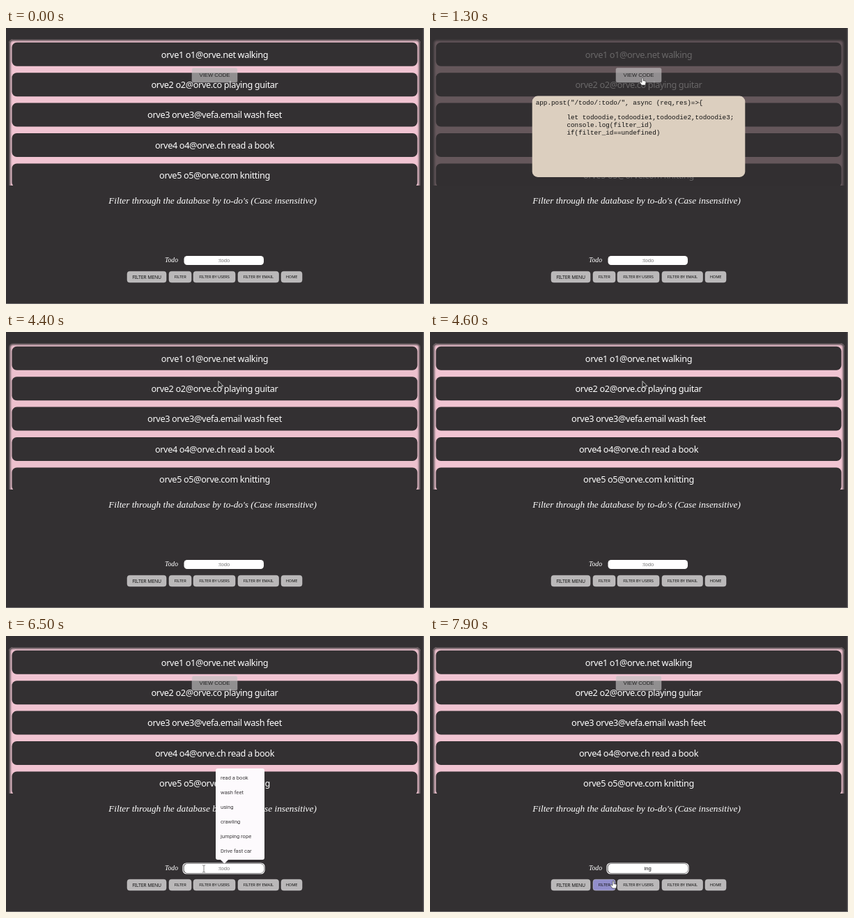
Recreate the animation shown at these times as an HTML page. Size 600x396 px, loop 8000 ms.

```html
<!DOCTYPE html>
<html lang="en">
<head>
<meta charset="utf-8">
<title>Filter by to-do</title>
<style>
  html, body { margin: 0; width: 100%; height: 100%; overflow: hidden; background: #333032; }
  svg { display: block; }
  text { white-space: pre; }
  .middle { text-anchor: middle; }
  .row { font: 12.7px "Noto Sans", sans-serif; letter-spacing: -.36px; fill: #fff; }
  .label { font: 5.7px "Noto Sans", sans-serif; letter-spacing: -.06px; fill: #111; }
  .serif { font: italic 13.25px "Liberation Serif", serif; fill: #fff; }
  .sans { font: 7.7px "Liberation Sans", sans-serif; }
  .code { font: 9.33px "Liberation Mono", monospace; fill: #111; }
  .option { font: 7.6px Roboto, sans-serif; fill: #3c3a3c; }
</style>
</head>
<body>
<svg width="600" height="396" viewBox="0 0 600 396">
  <defs>
    <clipPath id="frame"><path d="M4 226V22a6 6 0 0 1 6-6H589a6 6 0 0 1 6 6V226z"/></clipPath>
    <filter id="soft" x="-5%" y="-5%" width="110%" height="110%"><feGaussianBlur stdDeviation="1.6"/></filter>
  </defs>
  <rect width="600" height="396" fill="#333032"/>
  <path d="M599.3 0V396M0 395.6H600" stroke="#777476"/>

  <g id="list" clip-path="url(#frame)">
    <rect x="4" y="16" width="591" height="212" fill="#f1c4d2"/>
    <rect x="4" y="16" width="591" height="230" rx="6" fill="none" stroke="#333032" stroke-width="4" filter="url(#soft)"/>
  </g>

  <g id="view">
    <rect x="267" y="57.5" width="65" height="20.5" rx="2" fill="#c2c0c1" stroke="#d0ced0" stroke-width=".5" opacity=".66"/>
    <text class="sans middle" x="299.5" y="70.4" fill="#222">VIEW CODE</text>
  </g>

  <text class="serif middle" x="296.5" y="252">Filter through the database by to-do's (Case insensitive)</text>
  <text class="serif" x="228" y="335.5" style="font-size:9.7px">Todo</text>
  <rect id="ring" x="254" y="326" width="117" height="15" rx="5" fill="none" stroke="#fff" stroke-width="1.2"/>
  <rect x="255.5" y="327" width="114.5" height="13" rx="4.5" fill="#fff"/>
  <text id="field" class="sans middle" x="312.7" y="335.8"></text>
  <g id="buttons"></g>

  <g id="options">
    <path d="M304 190H368a3 3 0 0 1 3 3V318a3 3 0 0 1-3 3H319L313.500 326.500 308 321H304a3 3 0 0 1-3-3V193a3 3 0 0 1 3-3z" fill="#fdfafd"/>
  </g>

  <g id="popup">
    <rect x="146.500" y="97.500" width="306" height="116.500" rx="8" fill="#dccfbf"/>
  </g>

  <path id="arrow" d="M0 0V9.500L2.300 7.500 3.800 11 5.300 10.300 3.800 7H6.800z" fill="#222" stroke="#eee" stroke-width=".8"/>
  <path id="hand" d="M-1 1Q0-.6 1 1V4.500L4 5Q5.200 5.200 5 7L4.200 11H-1.200L-4 7Q-4.300 5.600-3 5.800L-1 7.200z" fill="#fff" stroke="#222" stroke-width=".6"/>
  <path id="beam" d="M-2-5Q0-5 0-4Q0-5 2-5M0-4V4M-2 5Q0 5 0 4Q0 5 2 5" fill="none" stroke="#777" stroke-width=".9"/>
</svg>
<script>
const LOOP = 8000;
const $ = id => document.getElementById(id);

function add(parent, tag, attrs, text = "") {
  const el = document.createElementNS("http://www.w3.org/2000/svg", tag);
  for (const name in attrs) el.setAttribute(name, attrs[name]);
  el.textContent = text;
  return parent.appendChild(el);
}

["orve1 o1@orve.net walking", "orve2 o2@orve.co playing guitar", "orve3 orve3@vefa.email wash feet",
 "orve4 o4@orve.ch read a book", "orve5 o5@orve.com knitting"].forEach((text, i) => {
  const y = 20.800 + i * 43.400;
  add($("list"), "rect", { x: 8.500, y, width: 582, height: 34, rx: 7, fill: "#333032" });
  add($("list"), "text", { class: "row middle", x: 299.500, y: y + 21.700 }, text);
});

const buttons = [["FILTER MENU", 174, 56], ["FILTER", 234, 32], ["FILTER BY USERS", 269, 60],
  ["FILTER BY EMAIL", 333, 58.500], ["HOME", 395, 30]].map(([text, x, width], i) => {
  const box = add($("buttons"), "rect", { x, y: 349.300, width, height: 15.700, rx: 3.500, stroke: "#d0ced0", "stroke-width": .5 });
  box.style.fill = "#bab8b9";
  const label = add($("buttons"), "text", { class: "label middle", x: x + width / 2, y: i ? 359.200 : 359.700 }, text);
  if (!i) label.style.cssText = "font-size:6.9px;letter-spacing:-.16px";
  return box;
});

["read a book", "wash feet", "using", "crawling", "jumping rope", "Drive fast car"].forEach((text, i) =>
  add($("options"), "text", { class: "option", x: 308, y: 205.700 + i * 21.100 }, text));

// Code lines: text, line number, indent in characters
const typed = ["if(filter_id==undefined){", "// contains regex"];
const codeLines = [['app.post("/todo/:todo/", async (req,res)=>{', 0, 0],
  ["let todoodie,todoodie1,todoodie2,todoodie3;", 2, 8], ["console.log(filter_id)", 3, 8], ["", 4, 8], ["", 5, 8]]
  .map(([text, line, indent]) =>
    add($("popup"), "text", { class: "code", x: 151.500 + indent * 5.600, y: 110.300 + line * 10.570 }, text));

const clamp = v => Math.min(1, Math.max(0, v));
const mix = (a, b, p) => a + (b - a) * p;
const bezier = (s, a, b) => 3 * s * (1 - s) ** 2 * a + 3 * s * s * (1 - s) * b + s ** 3;

// The CSS "ease" curve
function ease(t, start, duration = 1000) {
  const x = clamp((t - start) / duration);
  let low = 0, high = 1;
  for (let i = 0; i < 20; i++) {
    const mid = (low + high) / 2;
    if (bezier(mid, .25, .25) < x) low = mid; else high = mid;
  }
  return bezier(low, .1, 1);
}

// Piecewise linear value through [time, value] stops
function along(t, stops) {
  const i = stops.findIndex(stop => t < stop[0]);
  if (i === 0) return stops[0][1];
  if (i < 0) return stops.at(-1)[1];
  const [[t0, v0], [t1, v1]] = [stops[i - 1], stops[i]];
  return mix(v0, v1, (t - t0) / (t1 - t0));
}

function place(id, visible, x, y) {
  $(id).setAttribute("visibility", visible ? "visible" : "hidden");
  $(id).setAttribute("transform", `translate(${x} ${y})`);
}

function draw(t) {
  const open = ease(t, 350) - ease(t, 3600);
  $("list").setAttribute("opacity", 1 - .74 * open);
  $("popup").setAttribute("opacity", open);
  $("popup").setAttribute("transform", `translate(299.5 172) scale(${open}) translate(-299.5 -172)`);
  $("view").setAttribute("opacity", 1 - ease(t, 3600, 950) + ease(t, 4600));

  const count = Math.floor(along(t, [[200, 10], [800, 17], [1300, 24], [3400, 44]]) + .001);
  codeLines[3].textContent = typed[0].slice(0, count);
  codeLines[4].textContent = typed[1].slice(0, Math.max(0, count - 27));

  const entry = "ing".slice(0, t < 6800 ? 0 : Math.floor((t - 6800) / 100) + 1);
  $("field").textContent = entry || ":todo";
  $("field").setAttribute("fill", entry ? "#111" : "#777");
  $("ring").setAttribute("opacity", t >= 6000 ? 1 : 0);
  $("options").setAttribute("opacity", t < 6800 ? clamp((t - 5950) / 100) : 0);

  const hover = clamp((t - 7600) / 250);
  buttons[1].style.fill = `rgb(${mix(186, 145, hover)} ${mix(184, 142, hover)} ${mix(185, 203, hover)})`;

  const down = ease(t, 4650, 1050), leave = ease(t, 7450, 350);
  const overField = t >= 5650 && t < 6800;
  place("hand", t >= 200 && t < 3700 || t >= 7650, t < 7000 ? 305 : mix(284, 263, leave), t < 7000 ? 71 : mix(334, 351, leave));
  place("arrow", t >= 3700 && t < 5650 || t >= 7500 && t < 7650,
    t < 7000 ? mix(305, 284, down) : mix(284, 263, leave), t < 7000 ? mix(70.500, 334, down) : mix(334, 351, leave));
  place("beam", overField, mix(305, 284, down), mix(70.500, 334, down));
}

function tick() {
  draw(performance.now() % LOOP);
  requestAnimationFrame(tick);
}
tick();
</script>
</body>
</html>
```
